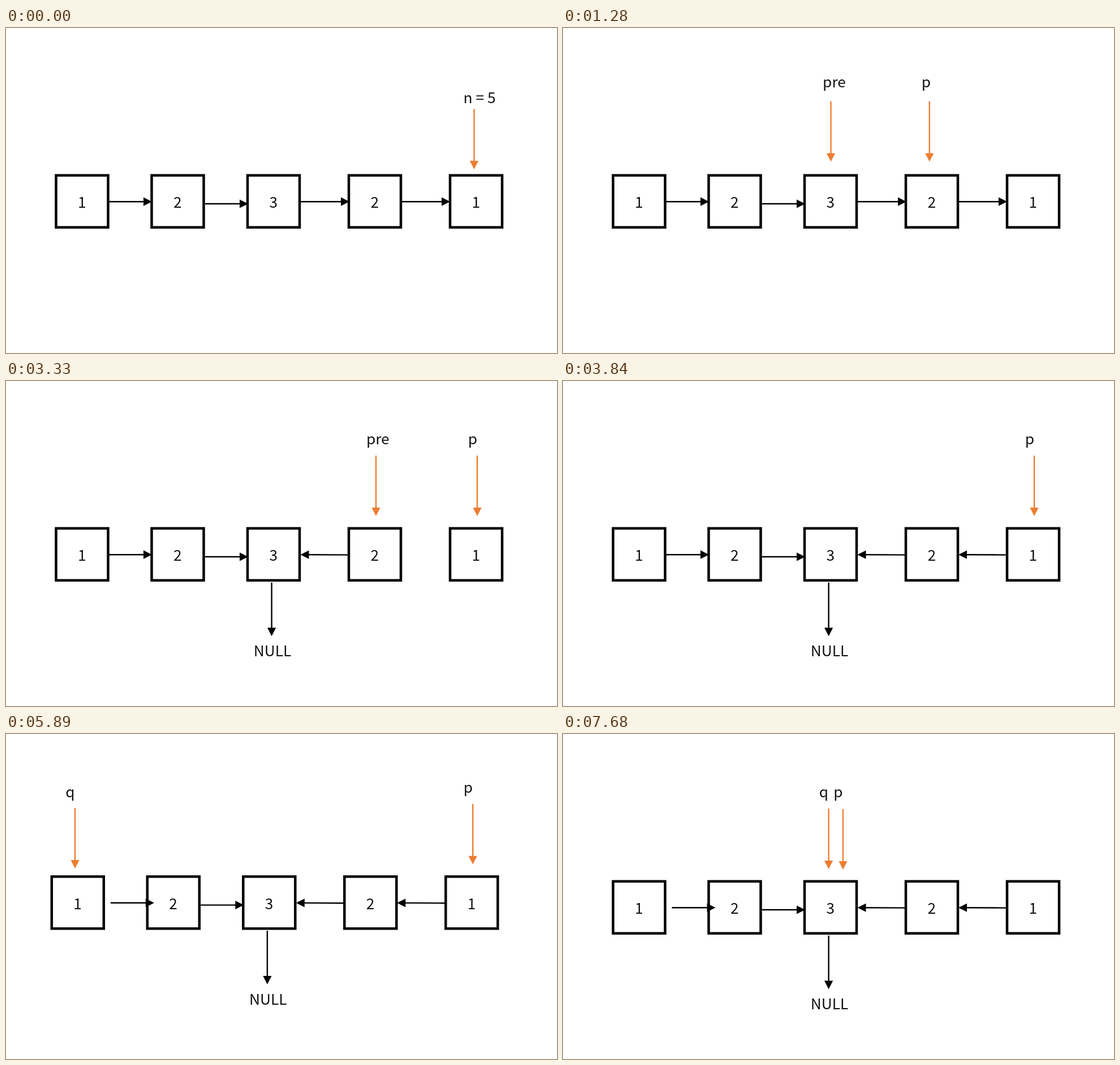
Animation, 974 px wide and 575 px high, one loop 8000 ms. Source, as an HTML page:

```html
<!DOCTYPE html>
<html lang="en">
<head>
<meta charset="utf-8">
<title>Linked list palindrome</title>
<style>
  html, body { margin: 0; width: 100%; height: 100%; overflow: hidden; background: #fff; }
  svg { display: block; width: 974px; height: 575px; }
  text {
    font: 300 26.3px "Noto Sans CJK SC", "Noto Sans", sans-serif;
    text-anchor: middle;
    fill: #111;
  }
  rect { fill: none; stroke: #000; stroke-width: 4.5; }
  g[data-step] { visibility: hidden; }
</style>
</head>
<body>
<svg id="stage" viewBox="0 0 974 575"></svg>
<script>
const STEP = 1280, LOOP = 8000;
const BLACK = "#000", ORANGE = "#ed7d31";
const NODES = [[88.5, 1], [257.5, 2], [427, 3], [606, 2], [785, 1]];

const box = ([x, value]) =>
  `<rect x="${x}" y="260.7" width="92" height="92"/>` + label(value, x + 45.7, 318.2);

const label = (text, x, y) => `<text x="${x}" y="${y}">${text}</text>`;

// Straight arrow with a solid triangular head ending at (x2, y2).
function arrow(x1, y1, x2, y2, color = BLACK) {
  const len = Math.hypot(x2 - x1, y2 - y1);
  const angle = Math.atan2(y2 - y1, x2 - x1) * 180 / Math.PI;
  return `<g transform="translate(${x1} ${y1}) rotate(${angle})">
    <path d="M0 0H${len - 13}" stroke="${color}" stroke-width="2.4"/>
    <path d="M${len} 0l-15 -7.6v15.2z" fill="${color}"/></g>`;
}

const pointer = (x, top, length = 107) => arrow(x, top, x, top + length, ORANGE);

const first = arrow(182, 307.2, 258, 307.2);
const firstShifted = arrow(192.5, 307.2, 269.5, 307.2);
const second = arrow(352, 311, 428, 311);
const third = arrow(521, 307.2, 607, 307.2);
const fourth = arrow(700, 307.2, 785, 307.2);
const thirdBack = arrow(605, 307.6, 520.5, 307.2);
const fourthBack = arrow(784, 307.6, 699, 307.2);
const toNull = arrow(469.6, 356.5, 469.6, 451.5) + label("NULL", 471, 487);

const forward = first + second + third + fourth;
const folded = second + thirdBack + fourthBack + toNull;

// Each step: links, pointers, and an optional offset for the list.
const steps = [
  { links: forward, marks: label("n = 5", 837, 133) + pointer(827.5, 143) },
  { links: forward,
    marks: label("pre", 479.5, 105.3) + pointer(473.5, 129.5) +
           label("p", 641.8, 105.3) + pointer(647.8, 129.5) },
  { links: first + second + thirdBack + toNull,
    marks: label("pre", 657.3, 112.3) + pointer(654, 132) +
           label("p", 824.8, 112.3) + pointer(833, 132) },
  { links: first + folded, marks: label("p", 824.8, 112.3) + pointer(833, 132) },
  { links: firstShifted + folded, shift: [-7.7, -8.4],
    marks: label("q", 113.5, 111.5) + pointer(122, 131) +
           label("p", 817, 104) + pointer(825.2, 123.7) },
  { links: firstShifted + folded,
    marks: label("q", 276.5, 104) + pointer(285.5, 123.7) +
           label("p", 631, 104) + pointer(639.5, 123.7) },
  { links: firstShifted + folded,
    marks: label("q", 461, 112.3) + pointer(469.6, 132) +
           label("p", 486.3, 112.3) + pointer(495, 133) }
];

const stage = document.getElementById("stage");
const boxes = NODES.map(box).join("");
stage.innerHTML = steps.map(({ links, marks, shift = [0, 0] }, i) =>
  `<g data-step="${i}"><g transform="translate(${shift})">${boxes}${links}</g>${marks}</g>`
).join("");

const groups = [...stage.children];
const start = performance.now();

function draw() {
  const t = Math.max(0, performance.now() - start) % LOOP;
  const current = Math.floor(t / STEP);
  groups.forEach((g, i) => g.style.visibility = i === current ? "visible" : "hidden");
  requestAnimationFrame(draw);
}
draw();
</script>
</body>
</html>
```
